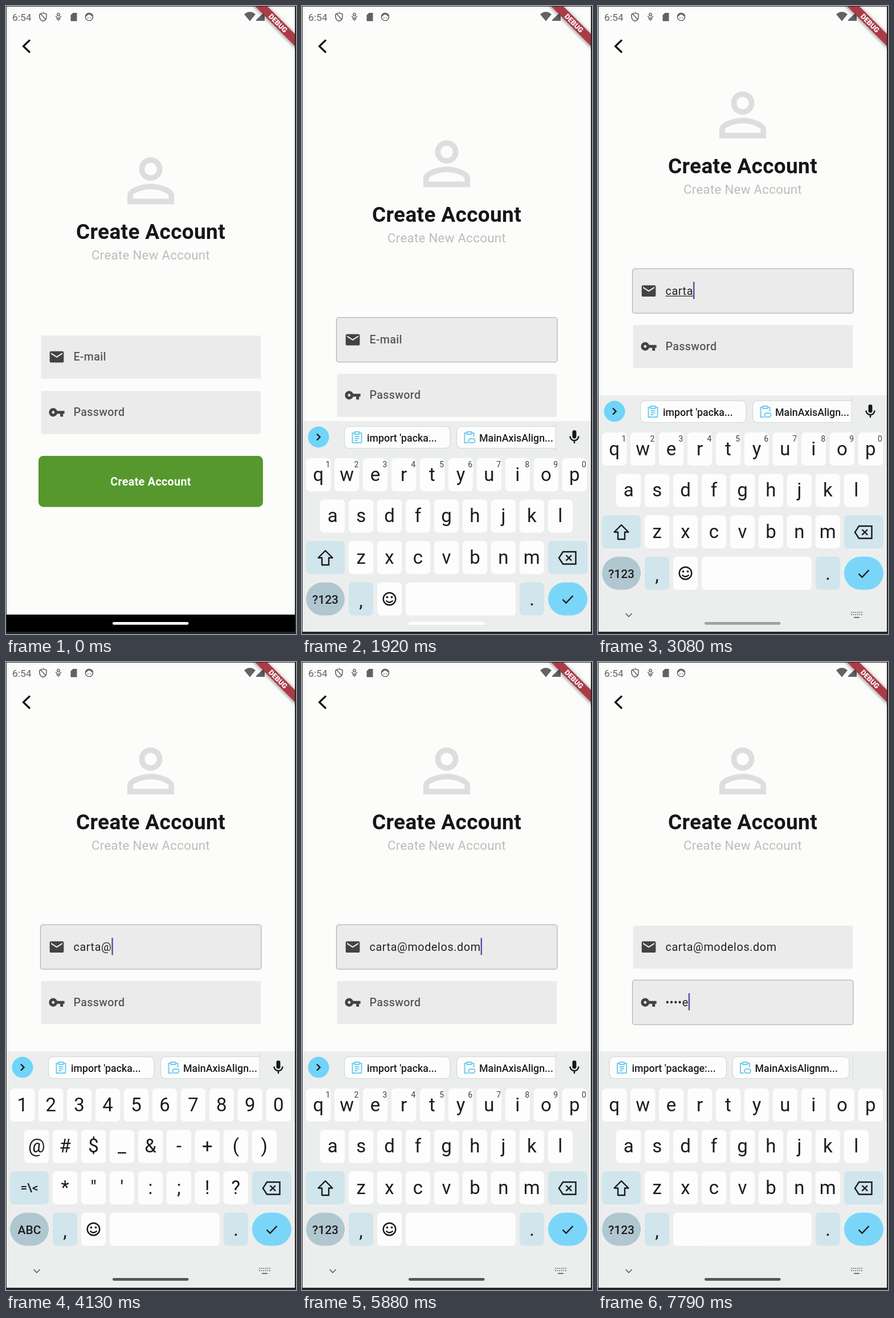
These frames come from a looping animation (509x1100 px, 8 s). An HTML page:

```html
<!DOCTYPE html>
<html lang="en">
<head>
<meta charset="utf-8">
<title>Create account form</title>
<style>
  html, body { margin: 0; width: 100%; height: 100%; overflow: hidden; background: #fcfcfb; }
  svg { display: block; width: 509px; height: 1100px; }
  text { font-family: Roboto, sans-serif; white-space: pre; }
  .mid { text-anchor: middle; }
  .line { fill: none; stroke: #17181a; stroke-width: 2.4; }
  .label { font-size: 19.76px; font-weight: 500; letter-spacing: .3px; fill: #5a5a5b; }
  .entry { font-size: 19.76px; letter-spacing: .62px; fill: #222; }
  .key { font-size: 33px; fill: #1b1c1e; text-anchor: middle; }
  .small { font-size: 21px; font-weight: 500; fill: #1b1c1e; text-anchor: middle; }
  .hint { font-size: 14px; fill: #3c3f41; text-anchor: middle; }
  .chip { font-size: 17.8px; font-weight: 500; fill: #1b1c1e; }
</style>
</head>
<body>
<svg id="stage" viewBox="0 0 509 1100">
  <defs>
    <clipPath id="body"><rect width="509" height="672"/></clipPath>
    <clipPath id="strip"><rect y="682" width="445" height="60"/></clipPath>
    <filter id="soft" x="-20%" y="-80%" width="140%" height="260%"><feGaussianBlur stdDeviation="3"/></filter>
  </defs>
  <rect width="509" height="1100" fill="#fcfcfb"/>

  <g id="button">
    <rect x="57" y="788" width="394" height="89.5" rx="8.5" fill="#56982d"/>
    <text class="mid" x="254" y="839.5" font-size="19.76" font-weight="700" letter-spacing=".3" fill="#fff">Create Account</text>
  </g>

  <g id="content">
    <path transform="translate(192.4 244.4) scale(5.14)" fill="#dedede" d="M12 5.9a2.1 2.1 0 1 1 0 4.2a2.1 2.1 0 0 1 0-4.2m0 9c2.97 0 6.1 1.46 6.1 2.1v1.1H5.9V17c0-.64 3.13-2.1 6.1-2.1M12 4a4 4 0 1 0 0 8a4 4 0 0 0 0-8zm0 9c-2.67 0-8 1.34-8 4v3h16v-3c0-2.66-5.33-4-8-4z"/>
    <text class="mid" x="254" y="408" font-size="37.05" font-weight="700" letter-spacing=".31" fill="#161617">Create Account</text>
    <text class="mid" x="254" y="444" font-size="22.23" letter-spacing=".31" fill="#bcbcbc">Create New Account</text>
    <g id="email"></g>
    <g id="password"></g>
  </g>

  <g id="status" fill="#606264">
    <text x="11" y="25.5" font-size="17.4">6:54</text>
    <path d="M65 12l6 2.3v4.5c0 4-2.6 6.600-6 7.800c-3.400-1.200-6-3.800-6-7.800v-4.500z M60.500 13.500L70 24" fill="none" stroke="#606264" stroke-width="1.6"/>
    <g fill="none" stroke="#606264" stroke-width="1.5">
      <circle cx="92" cy="15" r="2.200"/>
      <path d="M87 17.500l5 4.500l5-4.500M88.500 21.500l3.500 3.500l3.500-3.500"/>
      <circle cx="146" cy="19" r="6.600"/>
      <path d="M140 18q2-4.500 6-4.500t6 4.500" stroke-width="2.800"/>
    </g>
    <path d="M117.500 12h7v14.500h-11V16z"/>
    <path d="M418 14.500q10-8.500 20 0L428 26.500z"/>
    <path d="M439 26V24.500L454 10V26z"/>
    <circle cx="144" cy="20.500" r="1"/><circle cx="148.500" cy="20.500" r="1"/>
  </g>
  <path d="M42 59.500L30.500 70.500L42 81.500" fill="none" stroke="#111" stroke-width="3.200"/>

  <rect id="nav" y="1066" width="509" height="34" fill="#000"/>
  <g id="keyboard"></g>
  <g id="tray" fill="none" stroke="#5c6062" stroke-width="1.700">
    <path d="M48.500 1064l5.500 5.500l5.500-5.500"/>
    <path d="M444 1062h20M444 1066h20" stroke-dasharray="2 1.600"/>
    <path d="M449 1071h10"/>
  </g>
  <rect id="pill" x="187" y="1079" width="133.500" height="4.800" rx="2.400"/>

  <g transform="translate(477.500 30) rotate(45)">
    <rect x="-60" y="-7" width="120" height="16" fill="#000" opacity=".45" filter="url(#soft)"/>
    <rect x="-60" y="-7.400" width="120" height="14.800" fill="#ab3b44"/>
    <text class="mid" y="4.500" font-size="12.600" font-weight="800" fill="#fff">DEBUG</text>
  </g>
  <path d="M0 .5H509M.5 0V1100" stroke="#252527" fill="none"/>
  <path d="M508 0V1100" stroke="#252527" stroke-width="2"/>
  <rect y="1096" width="509" height="4" fill="#252527"/>
</svg>

<script>
const $ = id => document.getElementById(id);
const LOOP = 8000;
const MAIL = 'carta@modelos.dom';
const PASS = 'teste';

const icons = {
  mail: 'M20 4H4c-1.100 0-2 .9-2 2v12c0 1.100.9 2 2 2h16c1.100 0 2-.9 2-2V6c0-1.100-.9-2-2-2zm0 4l-8 5l-8-5V6l8 5l8-5z',
  key: 'M12.650 10C11.830 7.670 9.610 6 7 6c-3.310 0-6 2.690-6 6s2.690 6 6 6c2.610 0 4.830-1.670 5.650-4H17v4h4v-4h2v-4zM7 14a2 2 0 1 1 0-4a2 2 0 0 1 0 4z'
};

// Form fields
function makeField(id, y, icon, label) {
  $(id).innerHTML = `
    <rect x="61.500" y="${y - 37.5}" width="385.500" height="75.500" rx="2" fill="#ebebeb"/>
    <rect class="ring" x="60.500" y="${y - 39}" width="387.500" height="78" rx="4" fill="#ebebeb" stroke="#b4b4bb" stroke-width="1.300"/>
    <path transform="translate(74.200 ${y - 14.8}) scale(1.235)" fill="#434245" d="${icons[icon]}"/>
    <text class="label" x="118.500" y="${y + 6.5}">${label}</text>
    <text class="entry" x="118.500" y="${y + 6.5}"></text>
    <path class="under" stroke="#222" stroke-width="1.300"/>
    <rect class="caret" y="${y - 16}" width="2.400" height="30" fill="#5b4ba2"/>`;
  const part = name => $(id).querySelector('.' + name);
  const entry = part('entry'), label_ = part('label'), caret = part('caret');
  const ring = part('ring'), under = part('under');
  return ({ text, focus, blink, underline }) => {
    entry.textContent = text;
    const end = 118.5 + (text ? entry.getComputedTextLength() : 0);
    label_.style.display = text ? 'none' : '';
    caret.setAttribute('x', end);
    caret.style.display = blink ? '' : 'none';
    ring.style.opacity = focus;
    under.setAttribute('d', underline && text ? `M118.500 ${y + 9}H${end}` : '');
  };
}
const drawMail = makeField('email', 614.7, 'mail', 'E-mail');
const drawPass = makeField('password', 711.7, 'key', 'Password');

// Keyboard
const WHITE = '#fdfdfd', BLUE = '#d0e5ec';
const box = (x, y, w, fill = WHITE, r = 7) =>
  `<rect x="${x}" y="${y}" width="${w}" height="58" rx="${r}" fill="${fill}"/>`;
const esc = c => c.replace('&', '&amp;').replace('<', '&lt;');
const label = (c, x, y, cls = 'key') => `<text class="${cls}" x="${x}" y="${y}">${esc(c)}</text>`;
const rows = [[28.7, 747], [53.7, 819.5], [103.6, 892]];
const step = 49.95;

const eachKey = (lines, draw) => lines.map((line, r) =>
  [...line].map((c, i) => draw(c, rows[r][0] + i * step, rows[r][1])).join('')).join('');
const legends = lines => eachKey(lines, (c, x, y) => label(c, x, y + 39.5));

function chip(x, w, text, link) {
  const cx = x + 22;
  return `<rect x="${x}" y="691.500" width="${w}" height="38" rx="8" fill="#fdfdfd" stroke="#d3d6d8" stroke-width="1.200"/>
    <g fill="none" stroke="#6fcdef" stroke-width="2">
      <path d="M${cx - 4} 703h-4v17h${link ? 6 : 16}M${cx + 4} 703h4v${link ? 7 : 17}M${cx - 4} 701h8v4h-8z"/>
      ${link ? `<rect x="${cx - 1}" y="713" width="11" height="7" rx="3.500"/>`
             : `<path d="M${cx - 4} 709h8M${cx - 4} 712.500h8M${cx - 4} 716h5"/>`}
    </g>
    <text class="chip" x="${x + 39.5}" y="717.500">${text}</text>`;
}

$('keyboard').innerHTML = `
  <rect y="682" width="509" height="500" fill="#eceeee"/>
  <g id="chipsA">
    <circle cx="29" cy="710" r="18.500" fill="#70d4f8"/>
    <path class="line" d="M26 704.500l5.500 5.500l-5.500 5.500"/>
    <g clip-path="url(#strip)">${chip(74.5, 185.5, "import 'packa...")}${chip(271.5, 190, 'MainAxisAlign...', true)}</g>
    <path d="M445 686V735" stroke="#d3d6d8"/>
    <rect x="474.500" y="698" width="7" height="14.500" rx="3.500" fill="#17181a"/>
    <path class="line" d="M470.500 708.500a7.500 7.500 0 0 0 15 0M478 716v5"/>
  </g>
  <g id="chipsB">
    ${chip(20, 205.5, "import 'package:...")}${chip(236, 205, 'MainAxisAlignm...', true)}
    <path d="M447.500 686V735" stroke="#d3d6d8"/>
  </g>
  ${eachKey(['qwertyuiop', 'asdfghjkl', 'zxcvbnm'], (c, x, y) => box(x - 21.7, y, 43.4))}
  ${box(7, 892, 68, BLUE)}${box(432, 892, 69, BLUE)}
  ${box(7, 964.5, 68, '#b1c7d0', 29)}${box(82, 964.5, 43, BLUE)}
  ${box(182, 964.5, 193)}${box(382, 964.5, 43, BLUE)}${box(432, 964.5, 69, '#7ad6f8', 29)}
  ${label(',', 103.5, 1008, 'key')}${label('.', 403.5, 1005, 'key')}
  <path class="line" d="M457.500 994.500l6 6l12-12.500"/>
  <path class="line" d="M458 911h22.500v21.500H458L451 921.700zM463.500 917l9.500 9.500M473 917l-9.500 9.500"/>
  <g id="letters">
    ${legends(['qwertyuiop', 'asdfghjkl', 'zxcvbnm'])}
    <path class="line" d="M41 909l12.500 12.500h-6.500v12.500h-12v-12.500h-6.500z" stroke-linejoin="round"/>
    ${label('?123', 41, 1001.5, 'small')}
  </g>
  <g id="symbols">
    ${legends(['1234567890', '@#$_&-+()', '*"\':;!?'])}
    ${label('=\\<', 41, 928, 'small')}${label('ABC', 41, 1001.5, 'small')}
  </g>
  <g id="hints">${[...'1234567890'].map((c, i) => label(c, 45.5 + i * step, 763, 'hint')).join('')}</g>
  <g id="smile">
    ${box(132, 964.5, 43)}
    <circle class="line" cx="153.500" cy="993.500" r="10.800"/>
    <circle cx="149.500" cy="990.500" r="1.800"/><circle cx="157.500" cy="990.500" r="1.800"/>
    <path class="line" d="M147.500 996.500q6 6 12 0"/>
  </g>
  <g id="wide">${box(132, 964.5, 243)}</g>`;

// Times at which each character arrives
const mailTimes = [2270, 2430, 2630, 2830, 3000, 4130, 4330, 4430, 4510, 4580, 4880, 5040, 5250, 5330, 5540, 5710, 5880];
const passTimes = [7130, 7280, 7430, 7580, 7710];
// time, keyboard drop, content lift
const slide = [[1880, 200, 0], [1920, 45, 30], [2040, 10, 72], [2110, 0, 98], [2180, 0, 110], [2250, 0, 115.5]];

const count = (times, t) => times.filter(at => at <= t).length;
const ramp = (t, a, b) => Math.min(1, Math.max(0, (t - a) / (b - a)));
const within = (t, a, b) => t >= a && t < b;
const show = (id, on) => { $(id).style.display = on ? '' : 'none'; };

function render(t) {
  const up = t >= 1880, onPass = t >= 6330, secret = t >= 6470;
  const [, drop, lift] = slide.filter(s => s[0] <= t).pop() || [0, 0, 0];
  const symbols = within(t, 3620, 4230);

  $('content').setAttribute('transform', `translate(0 ${-lift})`);
  $('keyboard').setAttribute('transform', `translate(0 ${drop})`);
  show('keyboard', up);
  show('nav', !up);
  show('tray', t >= 2250);
  show('chipsA', !secret);
  show('chipsB', secret);
  show('letters', !symbols);
  show('symbols', symbols);
  show('hints', !secret && !symbols);
  show('smile', !secret);
  show('wide', secret);
  const shade = Math.round(255 - 170 * ramp(t, 2600, 3460));
  $('pill').setAttribute('fill', `rgb(${shade},${shade},${shade})`);

  drawMail({
    text: MAIL.slice(0, count(mailTimes, t)),
    focus: onPass ? 0 : ramp(t, 960, 1170),
    blink: within(t, 1080, 1580) || within(t, 2080, 6330),
    underline: t < 4130
  });
  const n = count(passTimes, t);
  drawPass({
    text: n ? '•'.repeat(n - 1) + PASS[n - 1] : '',
    focus: onPass ? ramp(t, 6280, 6470) : 0,
    blink: within(t, 6380, 6880) || t >= 7130
  });
}

const start = performance.now();
function tick() {
  render((performance.now() - start) % LOOP);
  requestAnimationFrame(tick);
}
tick();
</script>
</body>
</html>
```
